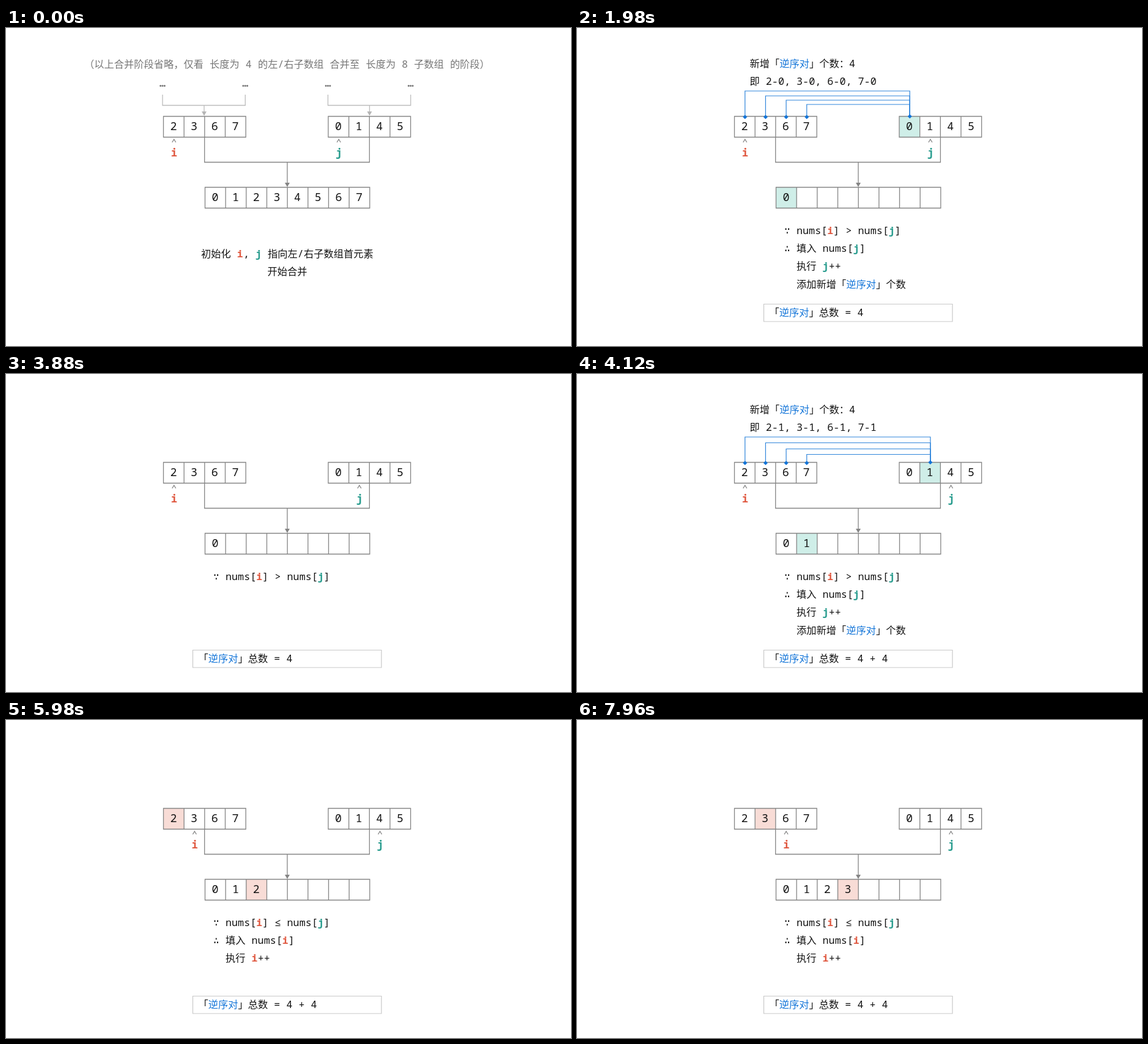
An HTML page for the animation above (8000 ms loop, 924x520 px).

```html
<!DOCTYPE html>
<html lang="zh-CN">
<head>
<meta charset="utf-8">
<title>Merge step</title>
<style>
  html, body { margin: 0; width: 100%; height: 100%; overflow: hidden; background: #fff; }
  svg { display: block; width: 924px; height: 520px; }
  text { font: 16.75px "Noto Sans Mono", "DejaVu Sans Mono", monospace; fill: #141414; white-space: pre; text-spacing-trim: space-all; }
  .cjk { font-family: "Noto Sans CJK SC", "Noto Sans CJK", sans-serif; font-size: 16.25px; }
  .key { fill: #1274d8; }
  .i, .j { font-weight: 700; }
  .i { fill: #e05a42; }
  .j { fill: #2a9d8f; }
  .mid { text-anchor: middle; }
  .num { font-size: 18.4px; }
  .ptr { font-size: 17.5px; }
  .sign { font-family: "DejaVu Sans Mono", "DejaVu Sans", monospace; }
  .soft { fill: #777; }
  .bold { font-weight: 700; }
  path { fill: none; stroke: #858585; stroke-width: 1.3; }
  .faint { stroke: #bcbcbc; }
  .link { stroke: #3186db; stroke-width: 1.2; }
  .tip { stroke: none; fill: #858585; }
  .tip.faint { fill: #b4b4b4; }
  .dot { stroke: none; fill: #1274d8; }
  .frame { stroke: #c9c9c9; stroke-width: 1.2; }
</style>
</head>
<body>
<svg id="stage" viewBox="0 0 924 520"></svg>
<script>
const CELL = 33.67;
const LEFT = [2, 3, 6, 7], RIGHT = [0, 1, 4, 5];
const LEFT_X = 257.5, RIGHT_X = 527, OUT_X = 325.5;
const TEAL = '#cfeee8', ROSE = '#f8dcd6';

const path = (d, cls = '') => `<path class="${cls}" d="${d}"/>`;
const label = (x, y, s, cls) => `<text x="${x}" y="${y}" class="${cls}">${s}</text>`;

// ~i and ~j are pointer names; Chinese runs get their own font and size.
const TOKENS = /逆序对|~[ij]|(?:(?!逆序对)[\u3000-\uffef])+|[^~\u3000-\uffef]+/g;
function line(x, y, s, cls = '') {
  const runs = s.match(TOKENS).map(t => {
    if (t === '逆序对') return `<tspan class="cjk key">${t}</tspan>`;
    if (t[0] === '~') return `<tspan class="${t[1]}">${t[1]}</tspan>`;
    return t >= '\u3000' ? `<tspan class="cjk">${t}</tspan>` : t;
  });
  return label(x, y, runs.join(''), cls);
}

function cells(x, y, values, count, marked, tint) {
  const w = CELL * count;
  let out = '', d = `M${x} ${y}h${w}v34h${-w}z`;
  if (marked >= 0) out += `<rect x="${x + marked * CELL}" y="${y}" width="${CELL}" height="34" fill="${tint}"/>`;
  for (let k = 1; k < count; k++) d += `M${x + k * CELL} ${y}v34`;
  out += path(d);
  values.forEach((v, k) => out += label(x + (k + 0.5) * CELL - 0.4, y + 22.8, v, 'num mid'));
  return out;
}

function pointer(x0, index, name) {
  const x = x0 + (index + 0.5) * CELL + 0.4;
  return path(`M${x - 3} 187l3 -5l3 5`) + label(x + 0.3, 210, name, `ptr mid ${name}`);
}

const arrow = (x, y, cls) => path(`M${x - 4} ${y - 7}h8l-4 7z`, `tip ${cls}`);
const diamond = (x, y) => path(`M${x - 3.5} ${y}l3.5 -3.5l3.5 3.5l-3.5 3.5z`, 'dot');

function source(x) {
  const mid = x + 68;
  return path(`M${x} 109v17.5h135.3v-17.5M${mid} 126.5v11`, 'faint') + arrow(mid, 143.5, 'faint') +
    label(x, 95.7, '…', 'mid soft bold') + label(x + 135.3, 95.7, '…', 'mid soft bold');
}

function links(to, tops) {
  const end = RIGHT_X + (to + 0.5) * CELL + 0.4;
  return tops.map((top, k) => {
    const x = LEFT_X + (k + 0.5) * CELL + 0.4;
    return path(`M${x} 145V${top}H${end}V144`, 'link') + diamond(x, 145.5);
  }).join('') + diamond(end, 144.5);
}

function added(to, tops) {
  const v = RIGHT[to];
  return line(282.5, 63.5, '新增「逆序对」个数：4') +
    line(282.5, 93, '即 ' + LEFT.map(n => `${n}-${v}`).join(', ')) + links(to, tops);
}

const because = op => label(343.8, 336.5, '∵', 'sign mid') + line(359, 336.5, `nums[~i] ${op} nums[~j]`);
const therefore = p => label(343.8, 366, '∴', 'sign mid') + line(359, 366, `填入 nums[~${p}]`) +
  line(359, 395.3, `执行 ~${p}++`);

const total = s => path('M305.5 451.5h308.5v28.5h-308.5z', 'frame') + line(314.5, 471, `「逆序对」总数 = ${s}`);

const intro = () => line(128, 64.5, '（以上合并阶段省略，仅看 长度为 4 的左/右子数组 合并至 长度为 8 子数组 的阶段）', 'soft') +
  source(256) + source(526.5) +
  line(319, 374.5, '初始化 ~i, ~j 指向左/右子数组首元素') + line(427.5, 404, '开始合并');

// filled: cells written below; take: pointer whose value was just written
function scene({ i, j, filled, take, extra }) {
  const fromLeft = take === 'i' ? i - 1 : -1, fromRight = take === 'j' ? j - 1 : -1;
  const out = [...Array(filled).keys()];
  return cells(LEFT_X, 144.5, LEFT, 4, fromLeft, ROSE) +
    cells(RIGHT_X, 144.5, RIGHT, 4, fromRight, TEAL) +
    cells(OUT_X, 260.5, out, 8, take ? filled - 1 : -1, take === 'i' ? ROSE : TEAL) +
    path('M324.7 178.5v41h269.7v-41M460 219.5v35') + arrow(460, 260, '') +
    pointer(LEFT_X, i, 'i') + pointer(RIGHT_X, j, 'j') + extra;
}

const note = line(359, 424.8, '添加新增「逆序对」个数');
const more = because('>') + therefore('j') + note;
const less = because('≤') + therefore('i');

const scenes = [
  { at: 0, i: 0, j: 0, filled: 8, extra: intro() },
  { at: 930, i: 0, j: 0, filled: 1, extra: because('>') + total('0') },
  { at: 1980, i: 0, j: 1, filled: 1, take: 'j', extra: added(0, [103, 111, 118, 125]) + more + total('4') },
  { at: 2950, i: 0, j: 1, filled: 1, extra: because('>') + total('4') },
  { at: 4040, i: 0, j: 2, filled: 2, take: 'j', extra: added(1, [103, 112.5, 122.5, 131.5]) + more + total('4 + 4') },
  { at: 4970, i: 0, j: 2, filled: 2, extra: because('≤') + total('4 + 4') },
  { at: 5980, i: 1, j: 2, filled: 3, take: 'i', extra: less + total('4 + 4') },
  { at: 6950, i: 1, j: 2, filled: 3, extra: because('≤') + total('4 + 4') },
  { at: 7960, i: 2, j: 2, filled: 4, take: 'i', extra: less + total('4 + 4') }
];

const stage = document.getElementById('stage');
let shown;
function draw() {
  const t = performance.now() % 8000;
  const now = scenes.findLast(s => s.at <= t);
  if (now !== shown) stage.innerHTML = scene(shown = now);
  requestAnimationFrame(draw);
}
draw();
</script>
</body>
</html>
```
